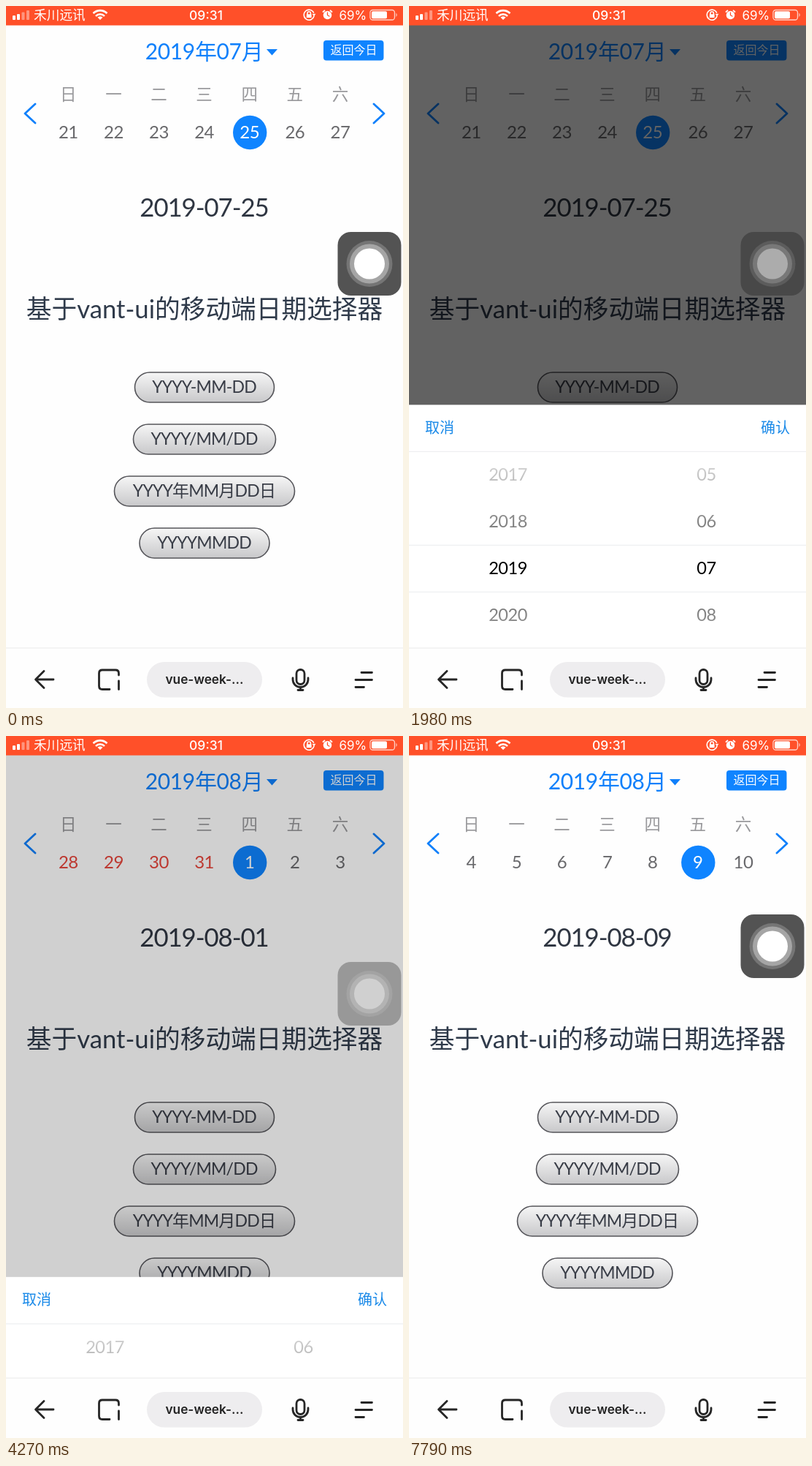
Animation, 544 px wide and 960 px high, one loop 8000 ms. Source, as an HTML page:

```html
<!DOCTYPE html>
<html lang="zh-CN">
<head>
<meta charset="utf-8">
<title>Week picker</title>
<style>
html, body { margin: 0; width: 100%; height: 100%; overflow: hidden; background: #fff; }
svg { display: block; width: 544px; height: 960px; overflow: hidden; }
text { font-family: Lato, "Noto Sans CJK SC", "Noto Sans CJK", sans-serif; }
.mid { text-anchor: middle; }
.ui { font-family: Inter, "Noto Sans CJK SC", "Noto Sans CJK", sans-serif; }
.line { fill: none; stroke-linecap: round; stroke-linejoin: round; }
</style>
</head>
<body>
<svg viewBox="0 0 544 960" xmlns="http://www.w3.org/2000/svg">
  <defs>
    <linearGradient id="pill" x2="0" y2="1">
      <stop offset="0" stop-color="#f6f6f6"/><stop offset="1" stop-color="#c8c8ca"/>
    </linearGradient>
    <linearGradient id="fadeTop" x2="0" y2="1">
      <stop offset="0" stop-color="#fff" stop-opacity=".9"/><stop offset="1" stop-color="#fff" stop-opacity=".4"/>
    </linearGradient>
    <linearGradient id="fadeBottom" x2="0" y2="1">
      <stop offset="0" stop-color="#fff" stop-opacity=".4"/><stop offset="1" stop-color="#fff" stop-opacity=".9"/>
    </linearGradient>
    <clipPath id="wheel"><rect y="64" width="544" height="320"/></clipPath>
  </defs>

  <rect width="544" height="960" fill="#fefefe"/>

  <g id="page">
    <text id="month" class="mid" x="271.5" y="72.5" font-size="30" letter-spacing="-.35" fill="#1080fb"></text>
    <path d="M357 59H372L364.5 67.5Z" fill="#1080fb"/>
    <rect x="435" y="47" width="82.500" height="27.500" rx="4" fill="#0f84ff"/>
    <text class="mid" x="476.500" y="66" font-size="16" fill="#fff">返回今日</text>
    <path class="line" d="M40 134L26 147L40 160M504 134L518 147L504 160" stroke="#1080fb" stroke-width="2.8"/>
    <circle id="dot" cy="173" r="23.200" fill="#0f84ff"/>
    <g id="week"></g>
    <text id="date" class="mid" x="271.500" y="288" font-size="34.800" letter-spacing="-1.1" fill="#2f3642"></text>
    <text class="mid" x="272" y="427" font-size="34.700" fill="#2f3a4a">基于vant-ui的移动端日期选择器</text>
    <g id="formats"></g>
  </g>

  <rect id="shade" y="26" width="544" height="852" fill="#000"/>

  <g id="panel">
    <rect width="544" height="390" fill="#fff"/>
    <g clip-path="url(#wheel)">
      <g id="years"></g>
      <g id="months"></g>
    </g>
    <rect y="64" width="544" height="128" fill="url(#fadeTop)"/>
    <rect y="256" width="544" height="128" fill="url(#fadeBottom)"/>
    <path d="M0 64H544M0 192H544M0 256H544" stroke="#eeeff1" stroke-width="1.2"/>
    <g font-size="20" fill="#1989e8">
      <text x="22" y="38.500">取消</text>
      <text x="522" y="38.500" text-anchor="end">确认</text>
    </g>
  </g>

  <g id="nav">
    <rect y="878" width="544" height="82" fill="#fefefe"/>
    <path d="M0 878H544" stroke="#f0f0f1" stroke-width="1.500"/>
    <rect x="193" y="897" width="158" height="48.500" rx="24.200" fill="#eeedef"/>
    <text class="mid ui" x="272" y="927" font-size="17.300" font-weight="600" fill="#222">vue-week-...</text>
    <g class="line" stroke="#262626" stroke-width="2.800">
      <path d="M65 921H41M52 909.500L40.500 921L52 932.500"/>
      <path d="M142 934.500H132Q127.500 934.500 127.500 930V912.500Q127.500 908 132 908H150Q154.500 908 154.500 912.500V915M154.500 923V934.500"/>
      <rect x="398" y="907.500" width="11" height="20" rx="5.500"/>
      <path d="M393 919V921A10.500 10.500 0 0 0 414 921V919M403.500 932V935.500M400 935.500H407"/>
      <path d="M487 911.500H501.500M479 921.500H501.500M479 931.500H490.500"/>
    </g>
  </g>

  <g id="status" fill="#fff">
    <rect width="544" height="26.500" fill="#ff5029"/>
    <rect x="9" y="13" width="4" height="6" rx="1"/>
    <rect x="15" y="11" width="4" height="8" rx="1"/>
    <rect x="21.500" y="8.500" width="4" height="10.500" rx="1" opacity=".4"/>
    <rect x="28" y="6" width="4" height="13" rx="1" opacity=".4"/>
    <text class="ui" x="38" y="19" font-size="17.700">禾川远讯</text>
    <g class="line" stroke="#fff" stroke-width="2.600" style="stroke-linecap:butt">
      <path d="M119.500 10A13.500 13.500 0 0 1 138.500 10M123 13.800A8.500 8.500 0 0 1 135 13.800"/>
    </g>
    <path d="M129 19L125.500 15.500Q129 12.800 132.500 15.500Z"/>
    <text class="mid ui" x="274" y="19" font-size="17.500" font-weight="500">09:31</text>
    <g class="line" stroke="#fff" stroke-width="1.600">
      <path d="M421.500 9A7 7 0 1 0 422 14M413 11.500V10A2.200 2.200 0 0 1 417.400 10V11.500"/>
    </g>
    <path d="M411.800 11.200H418.600V16H411.800ZM419.500 10.800H424.500L422 14Z"/>
    <circle cx="440.500" cy="12.500" r="5.800"/>
    <path class="line" d="M434.500 8L436.500 6.300M446.500 8L444.500 6.300" stroke="#fff" stroke-width="1.800"/>
    <path class="line" d="M440.500 9V12.500L443 14" stroke="#ff5029" stroke-width="1.300"/>
    <text class="ui" x="456.500" y="19" font-size="17">69%</text>
    <rect x="499" y="5.500" width="33.500" height="13.500" rx="3.500" fill="none" stroke="#fff" stroke-opacity=".75" stroke-width="1.300"/>
    <rect x="501" y="7.300" width="21" height="9.900" rx="1.800"/>
    <path d="M534.500 9.500Q537 12.200 534.500 15Z" opacity=".75"/>
  </g>

  <g id="touch">
    <rect id="touchBack" x="-43.500" y="-43.500" width="87" height="87" rx="18" fill="#000"/>
    <g id="knob" fill="#fff">
      <circle r="31.500" fill-opacity=".2"/>
      <circle r="27" fill-opacity=".35"/>
      <circle r="21"/>
    </g>
  </g>
</svg>

<script>
const LOOP = 8000;
const NS = 'http://www.w3.org/2000/svg';
const $ = id => document.getElementById(id);
const pad = n => String(n).padStart(2, '0');
const clamp = x => Math.min(1, Math.max(0, x));

function add(parent, tag, attrs, text = '') {
  const el = document.createElementNS(NS, tag);
  for (const k in attrs) el.setAttribute(k, attrs[k]);
  el.textContent = text;
  parent.appendChild(el);
  return el;
}

function bezier(x1, y1, x2, y2) {
  const at = (a, b, s) => 3 * a * s * (1 - s) ** 2 + 3 * b * s * s * (1 - s) + s ** 3;
  return x => {
    if (x <= 0 || x >= 1) return clamp(x);
    let lo = 0, hi = 1;
    for (let i = 0; i < 24; i++) {
      const m = (lo + hi) / 2;
      if (at(x1, x2, m) < x) lo = m; else hi = m;
    }
    return at(y1, y2, lo);
  };
}
const ease = bezier(.25, .1, .25, 1);
const settle = bezier(.23, 1, .68, 1);
const smooth = x => x * x * (3 - 2 * x);
const span = (t, from, len, fn = ease) => fn(clamp((t - from) / len));

// keys: [time, value...], eased between neighbours
function track(keys, t) {
  let i = 0;
  while (i < keys.length - 1 && t >= keys[i + 1][0]) i++;
  const a = keys[i], b = keys[i + 1] || a;
  const p = a === b ? 0 : smooth(clamp((t - a[0]) / (b[0] - a[0])));
  return a.slice(1).map((v, k) => v + (b[k + 1] - v) * p);
}

const colX = i => 85.3 + 62.1 * i;
const days = [...'日一二三四五六'].map((name, i) => {
  add($('week'), 'text', { class: 'mid', x: colX(i), y: 128.5, 'font-size': 22.5, fill: '#98989b' }, name);
  return add($('week'), 'text', { class: 'mid', x: colX(i), y: 181, 'font-size': 24, 'letter-spacing': -.5 });
});

[['YYYY-MM-DD', 191], ['YYYY/MM/DD', 195], ['YYYY年MM月DD日', 247], ['YYYYMMDD', 178]].forEach(([label, w], i) => {
  const y = 501 + 71 * i;
  add($('formats'), 'rect', { x: 272 - w / 2, y, width: w, height: 41, rx: 20.5, fill: 'url(#pill)', stroke: '#55555a', 'stroke-width': 1.6 });
  add($('formats'), 'text', { class: 'mid', x: 271.5, y: y + 28, 'font-size': 23, 'letter-spacing': -.8, fill: '#383c46' }, label);
});

function wheel(id, x, first, last, picked) {
  for (let n = first; n <= last; n++) {
    add($(id), 'text', { class: 'mid', x, y: 232 + 64 * (n - picked), 'font-size': 23.6, 'letter-spacing': -.5 }, pad(n));
  }
}
wheel('years', 135.5, 2015, 2023, 2019);
wheel('months', 407.5, 1, 12, 7);

// [time, month index, first day of the week, selected column]
const weeks = [
  [0, 6, 21, 4], [4140, 7, -3, 4], [5630, 7, 4, 4],
  [6000, 7, 11, 4], [6370, 7, 4, 4], [7730, 7, 4, 5]
];
let shown = null;

function showWeek(week) {
  if (week === shown) return;
  shown = week;
  const [, month, first, sel] = week;
  days.forEach((el, i) => {
    const d = new Date(Date.UTC(2019, month, first + i));
    el.textContent = d.getUTCDate();
    el.setAttribute('fill', i === sel ? '#fff' : d.getUTCMonth() === month ? '#69696c' : '#e5443a');
  });
  $('dot').setAttribute('cx', colX(sel) + .5);
  $('month').textContent = `2019年${pad(month + 1)}月`;
  $('date').textContent = `2019-${pad(month + 1)}-${pad(first + sel)}`;
}

const touchPath = [[4830, 498, 352.5], [5010, 510, 293], [5090, 510, 287.5], [5260, 498, 287.5]];
// [time, plate opacity, knob opacity]
const touchAlpha = [[60, .67, 1], [620, .27, .55], [4790, .27, .55], [4890, .67, 1]];

function draw(t) {
  showWeek(weeks.filter(w => w[0] <= t).pop());

  const shade = span(t, 1806, 300) - span(t, 4137, 300);
  $('shade').setAttribute('opacity', .7 * shade);
  const open = span(t, 1809, 300) - span(t, 4159.5, 300);
  $('panel').setAttribute('transform', `translate(0 ${878 - 384 * open})`);

  const drag = -76 * span(t, 2920, 230, smooth) + 12 * span(t, 3370, 220, settle);
  $('months').setAttribute('transform', `translate(0 ${drag})`);

  const [plate, knob] = track(touchAlpha, t);
  $('touch').setAttribute('transform', `translate(${track(touchPath, t)})`);
  $('touchBack').setAttribute('opacity', plate);
  $('knob').setAttribute('opacity', knob);
}

const start = performance.now();
function tick() {
  draw((performance.now() - start) % LOOP);
  requestAnimationFrame(tick);
}
tick();
</script>
</body>
</html>
```
